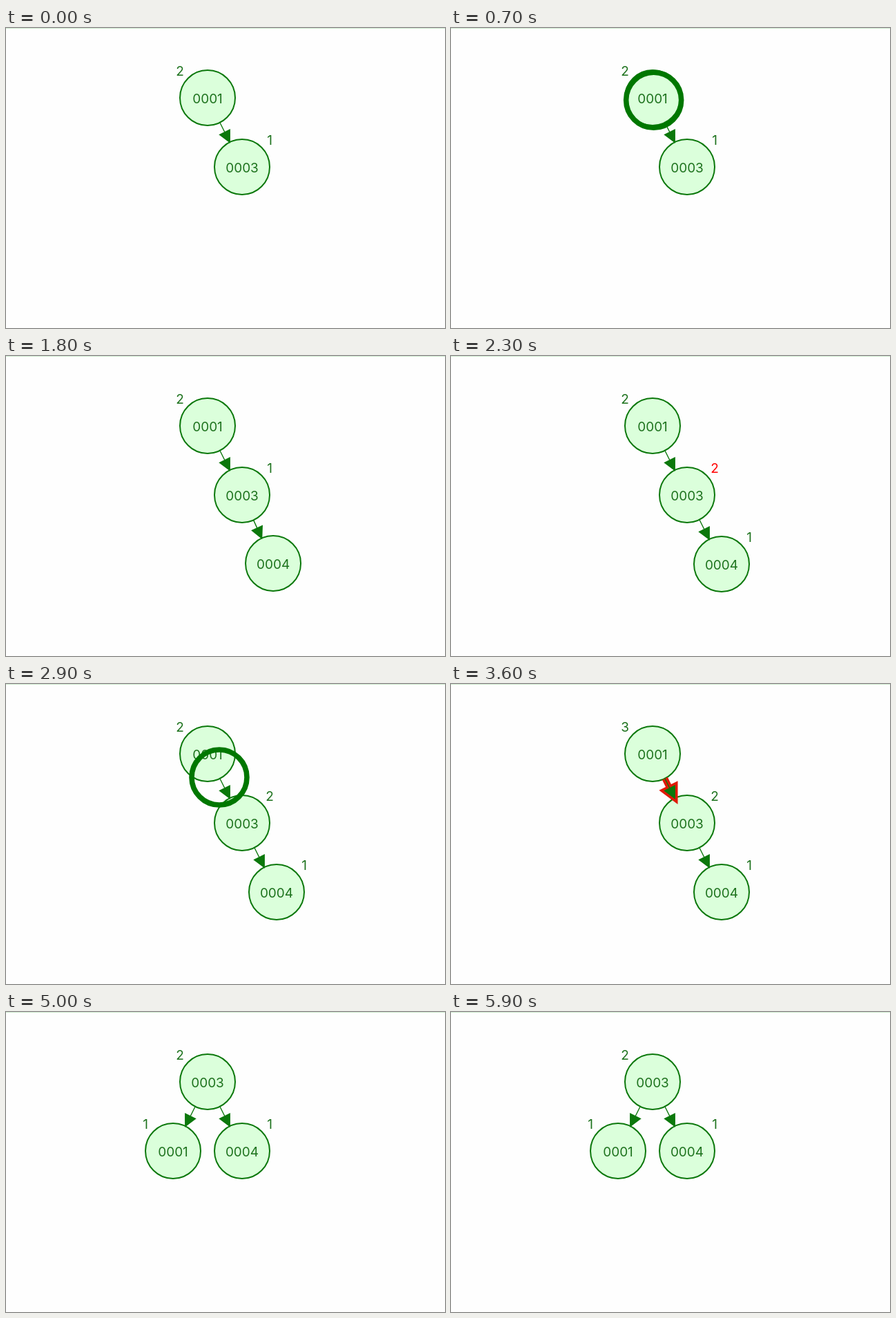
These frames come from a looping animation (636 by 434 pixels, 6000 ms). An HTML page with a canvas:

```html
<!DOCTYPE html>
<html lang="en">
<head>
<meta charset="utf-8">
<title>Balanced tree insertion</title>
<style>
html, body { margin: 0; width: 100%; height: 100%; overflow: hidden; background: #fefefe; }
canvas { display: block; }
</style>
</head>
<body>
<canvas id="stage" width="636" height="434"></canvas>
<script>
const ctx = document.getElementById('stage').getContext('2d');
const LOOP = 6000, TICK = 100, MOVE = 303, R = 40;
const GREEN = '#0c780c', TEXT = '#1d721d', FILL = '#dbffdb', RED = '#ff0000';

// Start of each step, in ms
const AT = {
  visitRoot: 290, descend: 690, visitChild: 1096, attach: 1500, tag: 1910,
  childHeight: 2300, unwind: 2700, rootHeight: 3100, markEdge: 3500, rotate: 3942
};

// Slots of the tree layout
const TOP = [292, 101], RIGHT = [342, 201], LEFT = [242, 201], DEEP = [392, 301];
const OUTSIDE = [-108, 201], TAG_OUTSIDE = [-148, 161];
const tagAt = ([x, y], side) => [x + side * 40, y - 39];

const mix = (a, b, f) => [a[0] + (b[0] - a[0]) * f, a[1] + (b[1] - a[1]) * f];
const progress = (t, start) => Math.min(1, Math.max(0, (t - start) / MOVE));
const during = (t, from, to) => t >= from && t < to;

// Triangle wave for highlights that swell and shrink
function pulse(t, range) {
  const period = 2 * range;
  const u = (t - 1410) / 210 + (range === 7 ? 12 : 0);
  const m = ((u % period) + period) % period;
  return 2 * (3 + Math.abs(m - range));
}

function disc([x, y], r, fill, stroke, width) {
  ctx.beginPath();
  ctx.arc(x, y, r, 0, 2 * Math.PI);
  if (fill) {
    ctx.fillStyle = fill;
    ctx.fill();
  }
  if (stroke) {
    ctx.strokeStyle = stroke;
    ctx.lineWidth = width;
    ctx.stroke();
  }
}

function text(str, [x, y], color = TEXT) {
  ctx.fillStyle = color;
  ctx.fillText(str, x, y + 7);
}

function node(name, pos, glow) {
  if (glow) disc(pos, R + glow, RED);
  disc(pos, R, FILL, GREEN, 2);
  text(name, [pos[0], pos[1] + 1]);
}

function arrow(tail, tip, color, lineWidth, headWidth) {
  const dx = tip[0] - tail[0], dy = tip[1] - tail[1];
  const len = Math.hypot(dx, dy) || 1, ux = dx / len, uy = dy / len;
  const bx = tip[0] - 16 * ux, by = tip[1] - 16 * uy;
  ctx.strokeStyle = ctx.fillStyle = color;
  ctx.lineWidth = lineWidth;
  ctx.beginPath();
  ctx.moveTo(...tail);
  ctx.lineTo(...tip);
  ctx.stroke();
  ctx.lineWidth = headWidth;
  ctx.beginPath();
  ctx.moveTo(...tip);
  ctx.lineTo(bx - 8 * uy, by + 8 * ux);
  ctx.lineTo(bx + 8 * uy, by - 8 * ux);
  ctx.closePath();
  ctx.fill();
  ctx.stroke();
}

function edge(a, b, glow) {
  const d = Math.hypot(b[0] - a[0], b[1] - a[1]);
  const tail = mix(a, b, R / d), tip = mix(b, a, R / d);
  if (glow) arrow(tail, tip, '#e01a08', glow, glow);
  arrow(tail, tip, GREEN, 1.4, 1.6);
}

function draw(t) {
  ctx.fillStyle = '#fefefe';
  ctx.fillRect(0, 0, 636, 434);
  ctx.fillStyle = '#cfebcf';
  ctx.fillRect(0, 0, 636, 1);
  ctx.font = '19px Inter, "Liberation Sans", sans-serif';
  ctx.textAlign = 'center';

  const rotated = t >= AT.rotate;
  const spin = progress(t, AT.rotate);
  const enter = progress(t, AT.attach);
  const one = mix(TOP, LEFT, spin);
  const three = mix(RIGHT, TOP, spin);
  const four = rotated ? mix(DEEP, RIGHT, spin) : mix(OUTSIDE, DEEP, enter);

  node('0001', one, during(t, AT.visitRoot, AT.descend) && pulse(t, 2));
  node('0003', three, during(t, AT.visitChild, AT.attach) && pulse(t, 2));
  if (t >= AT.attach) node('0004', four);

  if (rotated) edge(three, one);
  else edge(one, three, t >= AT.markEdge && pulse(t, 7));
  if (t >= AT.attach) edge(three, four);

  const rootHeight = rotated ? 1 : t >= AT.rootHeight ? 3 : 2;
  text(rootHeight, mix(tagAt(TOP, -1), tagAt(LEFT, -1), spin),
    during(t, AT.rootHeight, AT.markEdge) ? RED : TEXT);
  text(t >= AT.childHeight ? 2 : 1, mix(tagAt(RIGHT, 1), tagAt(TOP, -1), spin),
    during(t, AT.childHeight, AT.unwind) ? RED : TEXT);
  if (t >= AT.tag) {
    text(1, rotated
      ? mix(tagAt(DEEP, 1), tagAt(RIGHT, 1), spin)
      : mix(TAG_OUTSIDE, tagAt(DEEP, 1), progress(t, AT.tag)));
  }

  if (during(t, AT.descend, AT.visitChild)) {
    disc(mix(TOP, RIGHT, progress(t, AT.descend)), R, null, '#007700', 7.6);
  }
  if (during(t, AT.unwind, AT.rootHeight)) {
    disc(mix(RIGHT, TOP, progress(t, AT.unwind)), R, null, '#007700', 7.6);
  }
}

const start = performance.now();
function loop() {
  const t = (performance.now() - start) % LOOP;
  draw(Math.floor(t / TICK) * TICK);
  requestAnimationFrame(loop);
}
loop();
</script>
</body>
</html>
```
